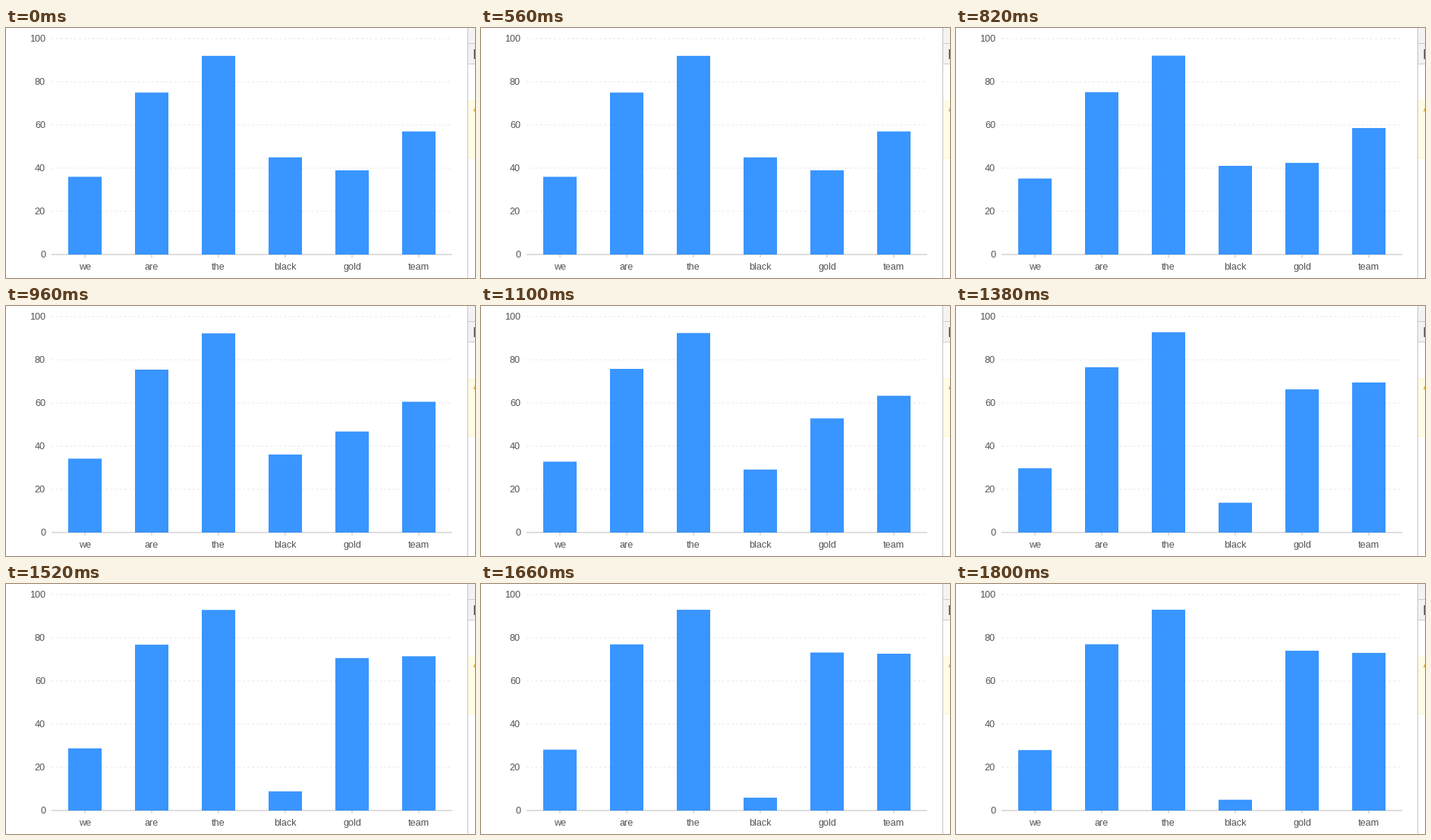
Write a matplotlib script that moves like this. It is 618 px wide and 330 px high and loops after 8 s.

```python
import numpy as np
import matplotlib.pyplot as plt
from matplotlib.animation import FuncAnimation
from matplotlib.patches import Polygon, Rectangle

W, H, DPI = 618, 330, 100
STEP, LOOP = 20, 8000          # ms
PX = 72 / DPI                  # one pixel in points
LEFT, RIGHT, BASE, UNIT = 60, 588, 299, 2.85
SLOT, BAR_W = 88, 44
START, DURATION = 542, 1254    # ms

LABELS = ["we", "are", "the", "black", "gold", "team"]
BEFORE = np.array([36, 75, 92, 45, 39, 57])
AFTER = np.array([28, 77, 93, 5, 74, 73])

# The chart refreshes in two uneven runs with a short stall between them.
TICKS = np.concatenate([
    560 + STEP * np.floor(2.25 * np.arange(17) + 0.25),
    1380 + STEP * np.floor(7 * np.arange(10) / 3 + 1e-6),
])

plt.rcParams["font.family"] = "Liberation Sans"
fig = plt.figure(figsize=(W / DPI, H / DPI), dpi=DPI, facecolor="white")
ax = fig.add_axes([0, 0, 1, 1])
ax.set_xlim(0, W)
ax.set_ylim(H, 0)
ax.axis("off")


def rect(x, y, w, h, color, **kw):
    patch = Rectangle((x, y), w, h, facecolor=color, linewidth=0, snap=False, **kw)
    return ax.add_patch(patch)


def line(xs, ys, color, z=1, **kw):
    ax.plot(xs, ys, color=color, lw=PX, zorder=z, snap=False,
            solid_capstyle="butt", **kw)


def label(x, y, text, align):
    ax.text(x, y, text, ha=align, va="baseline", color="#545454",
            fontsize=12.6 * PX)


def draw_axes():
    for value in range(0, 101, 20):
        y = BASE - value * UNIT
        if value:
            line([LEFT, RIGHT], [y, y], "#e8e8e8", linestyle=(0, (3, 3)))
        label(52, y + 4, str(value), "right")
    line([LEFT, RIGHT], [BASE, BASE], "#bfbfbf")
    for i, text in enumerate(LABELS):
        x = LEFT + SLOT * (i + 0.5)
        line([x, x], [BASE, BASE + 4], "#bfbfbf")
        label(x, 319, text, "center")


def draw_side_panel():
    rect(609, 0, 9, 47, "#f3f3f3")
    rect(609, 20, 9, 1, "#cccccc")
    rect(609, 47, 9, 1, "#cccccc")
    rect(616.6, 28, 1.4, 13, "#4a4a4a")
    rect(609, 96, 9, 76, "#fff5c2")
    rect(609, 97, 9, 74, "#fffbe5")
    ax.add_patch(Polygon([(615.8, 110), (618, 104.5), (618, 110)],
                         facecolor="#e0b040", linewidth=0))
    rect(608, 0, 1, H, "#c4c4c4")


def ease(p):
    p = min(max(p, 0), 1)
    return 2 * p * p if p < 0.5 else 1 - 2 * (1 - p) ** 2


def values_at(ms):
    k = np.searchsorted(TICKS, ms, side="right")
    p = ease((TICKS[k - 1] - START) / DURATION) if k else 0
    return BEFORE + (AFTER - BEFORE) * p


def update(i):
    for bar, value in zip(bars, values_at(i * STEP)):
        bar.set_y(BASE - value * UNIT)
        bar.set_height(value * UNIT)
    return bars


draw_axes()
draw_side_panel()
bars = [rect(LEFT + SLOT * i + (SLOT - BAR_W) / 2, BASE, BAR_W, 0,
             "#1683ff", alpha=0.85, zorder=2) for i in range(len(LABELS))]

anim = FuncAnimation(fig, update, frames=LOOP // STEP, interval=STEP,
                     repeat=True, repeat_delay=0)
plt.show()
```
